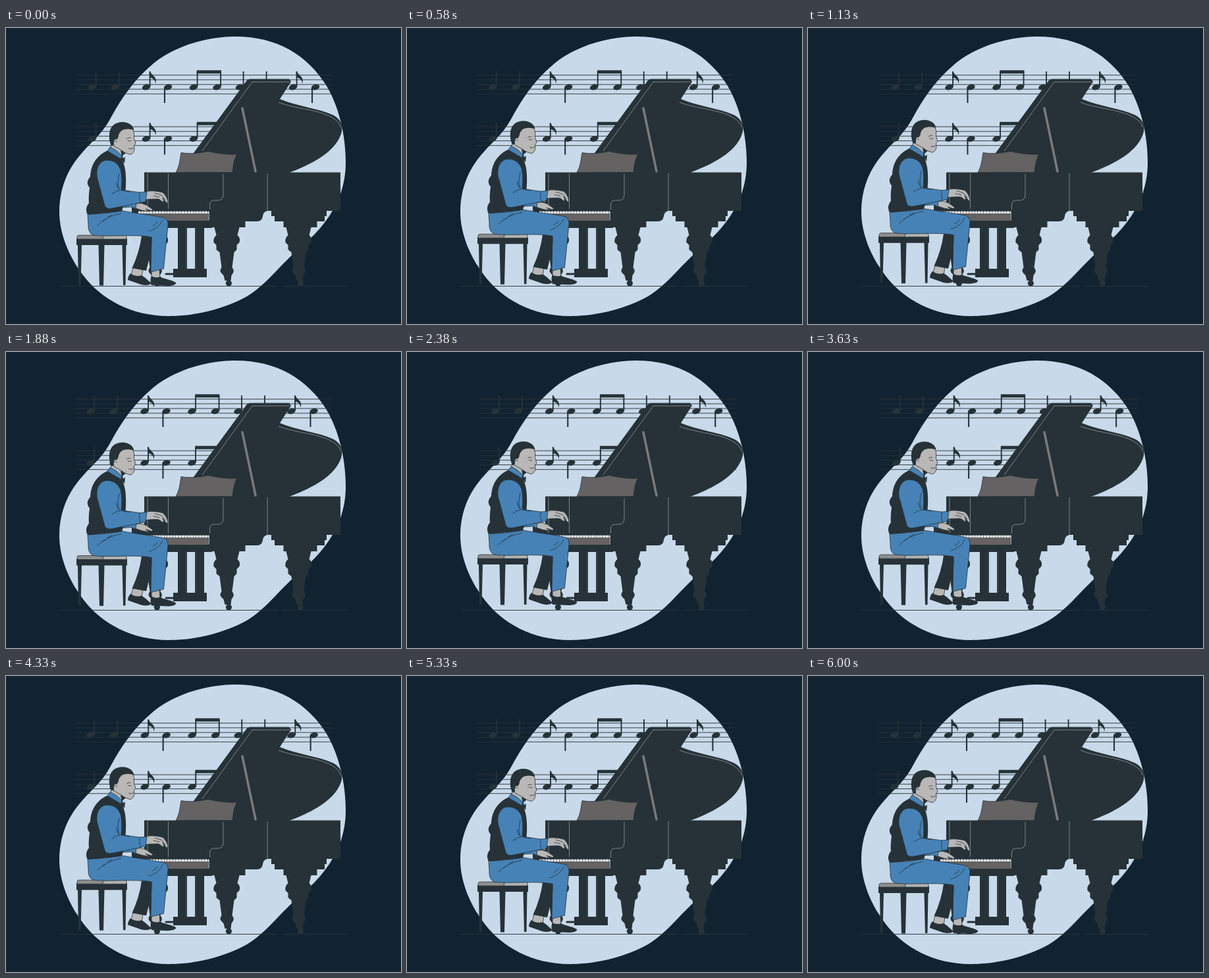
Write an HTML page that moves like this. It is 600 px wide and 450 px high and loops after 6.04 s.

```html
<!DOCTYPE html>
<html lang="en">
<head>
<meta charset="utf-8">
<title>Pianist</title>
<style>
html, body { margin: 0; width: 100%; height: 100%; overflow: hidden; background: #112331; }
svg { display: block; width: 100vw; height: 100vh; }
.dark { fill: #263238; }
.gray { fill: #646262; }
.skin { fill: #b9b8b7; }
.blue { fill: #4682b6; }
.ink { fill: none; stroke: #263238; }
.trim { fill: none; stroke: #929a9e; stroke-width: .8; }
.edged { stroke: #263238; stroke-width: .8; stroke-linejoin: round; }
.thin { stroke-width: .8; stroke-linecap: round; }
</style>
</head>
<body>
<svg viewBox="0 0 600 450">
  <defs>
    <path id="leg" d="M-23 294H28V303H19L16 315Q21 319 19 326L15 330V337L11 341L8 364Q12 369 9 373L7 376L6 384H-3L-5 376L-8 373Q-12 369 -8 364L-11 341L-16 337V330L-20 326Q-21 319 -16 315L-19 303H-23Z M7.5 388a4.6 4.6 0 1 1 -9.2 0a4.6 4.6 0 1 1 9.2 0Z"/>
  </defs>

  <path fill="#c8d9e9" d="M345 13C410 12 457 40 487 88C508 124 516 168 516 205C516 258 488 299 450 331C415 361 396 390 366 408C330 428 285 438 248 438C190 438 145 412 118 377C95 347 81 312 81 279C81 245 93 214 117 188C132 171 147 160 160 135C177 104 196 77 225 53C258 27 303 14 345 13Z"/>
  <path class="ink" stroke-width=".9" d="M82 392.5H413M420 392.5H517"/>

  <g id="music"></g>

  <g id="piano">
    <g class="dark">
      <use href="#leg" x="226.5"/>
      <use href="#leg" x="335.5"/>
      <use href="#leg" x="444.5"/>
      <path d="M244 292H313V304H244ZM261 303H275V367H261ZM287 303H301V367H287ZM254 366H305V379H254Z"/>
      <path d="M285 190L366 79.500Q368 77.500 371 77.500H430L433 81.500L416 108C442 119 474 122 496 132C511 139 514 153 506 168C495 190 465 207 430 220H270Z"/>
      <path d="M210 219.5H508V278H397Q391 279 390 286Q389 294 381 294H309V282H191V264H210Z"/>
      <path d="M403 277H487V286H484V294H408V286H403Z"/>
    </g>
    <path class="ink" stroke-width="3" stroke-linecap="round" d="M243 374H256"/>
    <path fill="none" stroke="#4b5a60" stroke-width=".8" d="M274 304V366M288 304V366"/>
    <path class="gray edged" d="M258 219.5C264 209 264 200 266 189.500C280 192 295 190 307 187.500C322 191 338 193 351 192C346 200 345 210 344 219.500Z"/>
    <path class="gray" d="M196 282H308.500V293H196Z"/>
    <path fill="none" stroke="#fff" stroke-width="3.200" stroke-dasharray="3.700 .7" d="M201 280.300H308.500"/>
    <path class="trim" d="M298 187L374 82H431M414 113C440 123 476 124 495 136Q506 142 508.500 151M215 221V275M246.500 221V275M330 222V253Q330 262 322 262H316Q309.500 262 309.500 269V276M397 221V278"/>
    <path fill="none" stroke="#7b7a7a" stroke-width="3.600" stroke-linecap="round" d="M359 122L379 218"/>
  </g>

  <g id="man">
    <!-- stool -->
    <path class="dark" d="M107 320H184V330H107ZM109 329H115L113.500 391H110ZM140.500 329H149.500L148 391.500H142ZM176.500 329H182.500L181.500 391H178Z"/>
    <path class="edged" fill="#8f8e8d" d="M111 315H150V321H108V318Q108 315 111 315Z"/>
    <path class="edged" fill="#b3b3b2" d="M153 315H180Q183 315 183 318V321H147Q147 315 153 315Z"/>

    <!-- far leg, feet -->
    <path class="skin edged" d="M193 364L208 367L206 379L190 376Z"/>
    <path class="dark" d="M206 316H221L219 345L213 369L191.500 365Q203 340 206 316Z"/>
    <path class="dark" d="M189 373Q185 378 185 383L205 390C212 392 219 391 221 388C216 384 210 378 206 376Q197 379 189 373Z"/>
    <path class="skin edged" d="M221 366H233L234 380H221Z"/>
    <path class="dark" d="M221 377Q218 384 221 391L245 392C253 392 259 390 258 387C250 382 240 382 234 378Q228 381 221 377Z"/>

    <!-- far arm -->
    <path class="blue edged" d="M176 266L199 263L198 275L190 272L176 273Z"/>
    <path class="skin edged" d="M198 267Q205 265 213 269L223 276L221 278L212 275L217 279Q206 278 197 274Z"/>

    <!-- neck, vest -->
    <path class="skin edged" d="M161 172L177 184L177 198L158 186Z"/>
    <path class="dark" d="M174 186L183 189L176 195Z"/>
    <path class="dark" d="M155 186C137 194 129 208 128 226Q120 235 127 243Q125 258 126 266Q119 275 124 284L176 279C181 260 184 235 181 215Q179 205 176 199Z"/>
    <path class="blue edged" d="M158 181L167 186L175.500 193.500L177 201L171 197L154 187Z"/>
    <path class="dark" d="M175 194L178 198L181 196L180 206L177 202L174 203Z"/>

    <!-- trousers -->
    <path class="blue edged" d="M124 283.500Q150 283 177 278C200 282 223 285 238 288Q247 290 246 300L239.500 366L220 371L221 318C200 313 155 318 133 315Q124 312 125 298Z"/>
    <path class="ink thin" d="M139 300Q152 286 175 282M146 294L151 291M154 288L161 284M217 309Q233 304 238 292M223 301Q228 299 230 295M221 318V330"/>

    <!-- near arm -->
    <path class="skin edged" d="M212 249Q221 246 238 250Q245 256 246 265L244 266L238 258L240 264L237 264Q233 259 228 260Q220 260 211 261Z"/>
    <path class="ink thin" d="M226 251L236 254L242 261M224 255L233 257"/>
    <path class="blue edged" d="M152 201C139 203 135 219 140 233L150 270Q152 276 162 274L212 264L214 249L203 250L175 246Q177 228 174 215Q168 200 152 201Z"/>
    <path class="ink thin" d="M172 221Q168 236 172 246M167 235L170 244M203 250Q202 257 204 265M176 247L188 249M161 252Q168 247 175 246"/>

    <!-- head -->
    <path class="skin edged" d="M164 156L192 151Q196 160 194.500 168L197 176L194.500 178.500L195 183Q195 190 189 192.500Q181 191 174 185L163 179Z"/>
    <path class="dark" d="M160 179Q156 171 157 161C158 149 166 143 177 143C187 143.500 193 148 194.500 155Q184 152 177 155Q171 159 170.500 166L168 170Q164 168 163.500 174L164 178Z"/>
    <ellipse class="skin" cx="167" cy="173.500" rx="2.800" ry="4.200"/>
    <path class="ink thin" d="M164.500 172Q167 170 168.500 173M183.500 168Q186 166 189 167M185 171Q187.500 173 190 171.500M186.500 183Q190 185.500 193.500 182.500"/>
  </g>
</svg>
<script>
const LOOP = 6040, CYCLE = 6000, SCALE = .87, RISE = 10;
const SHAKE = [0, -1, 2, -4, 4, -4, 4, -4, 2, -1, 0];
const music = document.getElementById('music');
const man = document.getElementById('man');

const stroke = (d, width) => `<path class="ink" stroke-width="${width}" d="${d}"/>`;
const head = x => `<ellipse class="dark" cx="${x}" cy="90" rx="6.4" ry="4.2" transform="rotate(-16 ${x} 90)"/>`;
const up = x => head(x) + stroke(`M${x + 5.6} 89V66`, 1.9);
const down = x => head(x) + stroke(`M${x - 5} 91V114`, 2.1);
const flagged = x => up(x) +
  `<path class="dark" d="M${x + 4.7} 66H${x + 6.4}C${x + 7} 72 ${x + 18} 74 ${x + 14} 84.5C${x + 14} 78 ${x + 9} 76 ${x + 5} 75Z"/>`;
const beamed = (a, b) => up(a) + up(b) + stroke(`M${a + 4.8} 66.8H${b + 6.4}`, 5);

function staff(dy) {
  let lines = '';
  for (let i = 0; i < 5; i++) lines += `M107 ${71.6 + i * 7.15}H497`;
  return `<g transform="translate(0 ${dy})">` + stroke(lines, .9) +
    [131, 166, 355, 390].map(up).join('') +
    [213, 436].map(flagged).join('') +
    [246, 470].map(down).join('') +
    beamed(285, 320.5) + '</g>';
}
music.innerHTML = staff(0) + staff(78.5);

function shakeAt(p) {
  const i = Math.min(Math.floor(p * 10), 9);
  return SHAKE[i] + (SHAKE[i + 1] - SHAKE[i]) * (p * 10 - i);
}

const start = performance.now();
function draw() {
  const p = Math.min((performance.now() - start) % LOOP / CYCLE, 1);
  const lift = RISE * (1 - Math.abs(1 - 2 * p));
  man.setAttribute('transform', `translate(0 ${-lift * SCALE})`);
  music.setAttribute('transform', `translate(${shakeAt(p) * SCALE} 0)`);
  requestAnimationFrame(draw);
}
draw();
</script>
</body>
</html>
```
